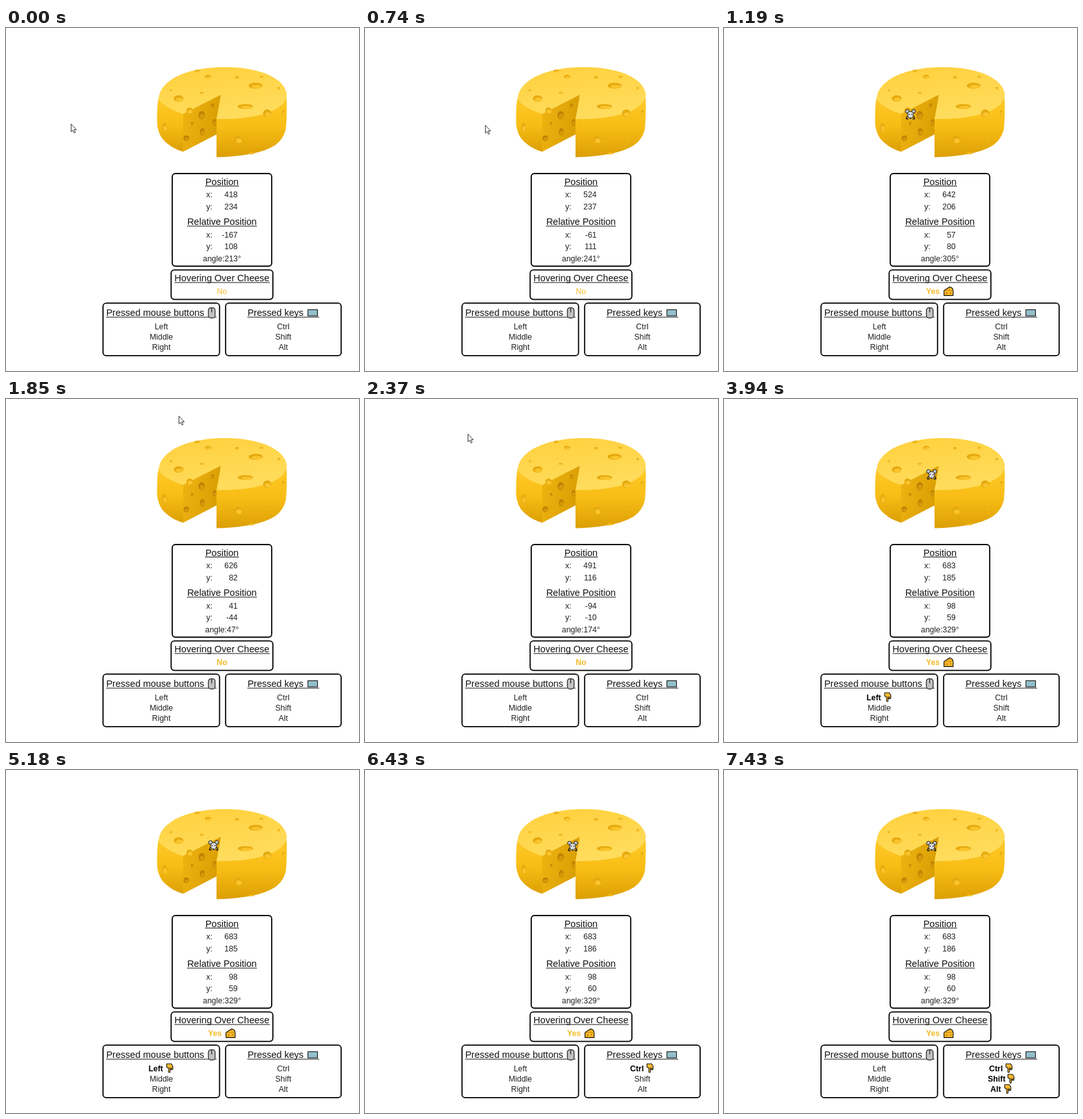
Recreate the animation shown at these times as an HTML page. Size 550 px wide and 535 px high, loop 8 s.

```html
<!DOCTYPE html>
<html lang="en">
<head>
<meta charset="utf-8">
<title>Cheese pointer tracker</title>
<style>
  html, body { margin: 0; height: 100%; overflow: hidden; background: #fff; }
  svg { display: block; }
  text { font: 12.4px "Liberation Sans", Arial, sans-serif; fill: #222; }
  .title { font-size: 14.54px; text-anchor: middle; fill: #111; }
  .mid { text-anchor: middle; }
  .end { text-anchor: end; }
  .bold { font-weight: bold; fill: #000; }
  #hover { fill: #f5ba28; }
</style>
</head>
<body>
<svg id="stage" width="550" height="535" viewBox="0 0 550 535">
  <defs>
    <linearGradient id="top" x2="0.3" y2="1">
      <stop stop-color="#ffd03c"/><stop offset="1" stop-color="#ffdc5c"/>
    </linearGradient>
    <linearGradient id="side" x2="0" y2="1">
      <stop offset=".15" stop-color="#fdc623"/><stop offset=".5" stop-color="#f8bd15"/><stop offset="1" stop-color="#dc9f05"/>
    </linearGradient>
    <linearGradient id="cut" x2="1" y2=".3">
      <stop stop-color="#f0b512"/><stop offset="1" stop-color="#d99e03"/>
    </linearGradient>
    <path id="hand" d="M1.3 1.2H8.5L10.9 5V9.6L9.4 10.8 8 9.8 6.6 10.6V14.2Q5.4 15.9 4.2 14.2V8L1.3 6.2ZM6.6 10.6V7M8.9 9.6V7" fill="#fcbb2f" stroke="#111" stroke-width="1.1" stroke-linejoin="round"/>
  </defs>

  <g id="cheese">
    <path fill="url(#side)" d="M238 108Q235 118 235.500 150Q237 163 243 172Q254 186 276 193V130Z"/>
    <path fill="url(#cut)" d="M276 133L335 103 328 166 276 193Z"/>
    <path fill="url(#side)" d="M328 141L437 106Q438.500 130 436 158Q432 174 419 183Q392 200 328 201.500Z"/>
    <path fill="url(#top)" d="M238 112C237 83 280 61 340 61C398 61 434 79 437.500 103C438 128 392 143 328 142L335 104 276 134Q250 126 238 112Z"/>
  </g>

  <g fill="none" stroke="#000" stroke-width="1.8">
    <rect x="259" y="227" width="155" height="144.500" rx="5"/>
    <rect x="257.300" y="377.300" width="158.500" height="46" rx="5"/>
    <rect x="151.200" y="429.200" width="181.500" height="82" rx="5"/>
    <rect x="342.200" y="429.200" width="180" height="82" rx="5"/>
  </g>
  <g id="labels"></g>

  <g stroke="#222" stroke-width="1.2">
    <rect x="315.300" y="436.300" width="10.500" height="16" rx="4" fill="#bfc1c2"/>
    <path d="M320.500 437V443.500"/>
    <rect x="470.400" y="439.400" width="15" height="9.600" fill="#92bfcb"/>
  </g>

  <text id="hover" class="mid" x="336.500" y="415">No</text>
  <g id="wedge" stroke="#111" stroke-linejoin="round">
    <path d="M342.800 409.500L351.500 403.800Q356.500 404.500 357 409.500V417.300H342.800Z" fill="#fcb92b" stroke-width="1.2"/>
    <path d="M342.800 409.500H357" stroke="#b87c10" stroke-width=".8"/>
    <g fill="#c8860c" stroke="none"><circle cx="347" cy="413.500" r="1.500"/><circle cx="353" cy="413" r="1.300"/><circle cx="351" cy="406.500" r="1"/></g>
  </g>

  <path id="arrow" d="M.5.7V12.800L3.200 10.300 5.200 14.700 7 13.900 5.100 9.600H8.800Z" fill="#fff" stroke="#222" stroke-width=".9"/>
  <g id="mouse" stroke="#1a1a1a" stroke-linejoin="round">
    <path d="M3.500 11.500L2 15.500 5 16M13.500 11.500L15 15.500 12 16" fill="none" stroke-width="1.500"/>
    <g fill="#c9cbcc" stroke-width="1"><circle cx="3.600" cy="4" r="2.900"/><circle cx="13.400" cy="4" r="2.900"/></g>
    <path d="M4.200 5.500Q8.500 2.800 12.800 5.500L13 10.500Q11.500 15.500 8.500 15.500T4 10.500Z" fill="#d9dbdc" stroke-width=".9"/>
    <path d="M6.300 8V9.600M10.700 8V9.600M8.500 13.300V15" stroke-width="1.400"/>
  </g>
</svg>

<script>
const LOOP = 8000, SCALE = 0.808, ORIGIN = { x: 585, y: 126 }, CHEESE = { x: 235.9, y: 61.6, w: 251, h: 174 };
const $ = id => document.getElementById(id);

function add(parent, tag, attrs, content = '') {
  const el = document.createElementNS('http://www.w3.org/2000/svg', tag);
  for (const name in attrs) el.setAttribute(name, attrs[name]);
  el.textContent = content;
  return parent.appendChild(el);
}
const label = (x, y, content, cls = '') => add($('labels'), 'text', { x, y, class: cls }, content);
const show = (el, on) => el.setAttribute('visibility', on ? 'visible' : 'hidden');

// Holes: x, y, rx, ry
[
  [389, 90, 11, 4.5], [373, 122.5, 12, 3.8], [269, 110, 7.5, 5], [286, 129, 5, 5], [315, 76, 5, 3],
  [298, 67, 4, 2], [360, 77, 3, 2], [257, 97, 2, 1.5], [305, 101, 3, 1.6], [398, 76, 3, 1.5],
  [407, 133, 6.5, 6], [425, 94, 2, 2], [305, 136, 5, 6.5], [322, 121, 2.5, 3.5], [290, 149, 1.8, 2.6],
  [306, 162, 3.8, 6], [281, 172, 4.5, 4.5], [325, 147, 2.8, 5], [247, 155, 3.5, 7], [362, 174, 6, 6],
  [432, 132, 2, 4], [410, 170, 2.2, 2.2], [382, 195, 5, 2]
].forEach(([cx, cy, rx, ry], i) => {
  const onCut = i > 11 && i < 18;
  add($('cheese'), 'ellipse', { cx, cy, rx, ry, fill: onCut ? '#bf8203' : '#e6a90f' });
  add($('cheese'), 'ellipse', { cx: cx + rx * .15, cy: cy + ry * .3, rx: rx * .75, ry: ry * .6, fill: onCut ? '#d39a0b' : '#f9c42c' });
});

// Titles: text, text centre, baseline, underline start and end
[
  ['Position', 336.5, 244.5, 310, 363], ['Relative Position', 336.5, 307, 282, 391],
  ['Hovering Over Cheese', 336.5, 395, 262.5, 411],
  ['Pressed mouse buttons', 232.5, 449, 156, 328], ['Pressed keys', 420, 449, 376, 488]
].forEach(([content, x, y, from, to]) => {
  label(x, y, content, 'title');
  add($('labels'), 'path', { d: `M${from} ${y + 2}H${to}`, stroke: '#111' });
});

const readouts = [264, 283, 326.5, 345].map((y, i) => {
  label(312, y, 'xy'[i % 2] + ':');
  return label(361, y, '', 'end');
});
const angleText = label(336.5, 363.5, '', 'mid');

// Inputs: name, centre, baseline, pressed start, hand x, press and release times
const inputs = [
  ['Left', 242, 469.5, 222, 249, 3940, 5630], ['Middle', 242, 486, 214, 257, 4570, 5180], ['Right', 242, 502],
  ['Ctrl', 432, 469.5, 413, 438, 6430, LOOP], ['Shift', 432, 486, 411, 441, 7430, LOOP], ['Alt', 432, 502, 415, 436, 6930, LOOP]
].map(([name, centre, y, left, handX, press, release]) => ({
  centre, left, press, release,
  text: label(centre, y, name),
  hand: add($('labels'), 'use', { href: '#hand', x: handX, y: y - 12.5 })
}));

// Pointer path: step, page x, page y
const path = [
  [-1, 418, 234], [5, 492, 240], [12, 611, 221], [14, 642, 206], [19, 671, 149], [24, 626, 82], [25, 613, 72],
  [27, 582, 69], [31, 505, 100], [33, 482, 135], [35, 484, 170], [37, 528, 205], [39, 581, 219], [44, 683, 185]
];

function slope(i, axis) {
  const a = path[i - 1], b = path[i + 1];
  return a && b ? (b[axis] - a[axis]) / (b[0] - a[0]) : 0;
}

function pointAt(step) {
  step = Math.min(Math.max(step, -1), 44);
  const i = Math.max(1, path.findIndex(p => p[0] >= step));
  const a = path[i - 1], b = path[i], span = b[0] - a[0], u = (step - a[0]) / span;
  const at = axis => Math.round(
    a[axis] * (1 + 2 * u) * (1 - u) ** 2 + b[axis] * u * u * (3 - 2 * u) +
    span * u * (1 - u) * (slope(i - 1, axis) * (1 - u) - slope(i, axis) * u));
  return { x: at(1), y: at(2) };
}

function draw(t) {
  let step = Math.floor((t - 280) / 65);
  if (step > 39) step = Math.max(39, step - 2); // short rest beside the cheese
  const p = pointAt(step);
  if (t >= 5880) p.y++;
  const rx = p.x - ORIGIN.x, ry = p.y - ORIGIN.y;
  const hovering = rx >= 0 && ry >= 0 && rx < CHEESE.w && ry < CHEESE.h;

  [p.x, p.y, rx, ry].forEach((value, i) => readouts[i].textContent = value);
  const degrees = Math.round(Math.atan2(-ry, rx) * 180 / Math.PI);
  angleText.textContent = `angle:${(degrees + 360) % 360}°`;

  $('hover').textContent = hovering ? 'Yes' : 'No';
  $('hover').setAttribute('x', hovering ? 325.5 : 336.5);
  $('hover').style.fontWeight = t < 1000 && !hovering ? 'normal' : 'bold';
  show($('wedge'), hovering);

  const place = `translate(${Math.round(CHEESE.x + rx * SCALE)} ${Math.round(CHEESE.y + ry * SCALE)})`;
  $('arrow').setAttribute('transform', place);
  $('mouse').setAttribute('transform', place);
  show($('arrow'), !hovering && t < 2980);
  show($('mouse'), hovering);

  for (const input of inputs) {
    const down = t >= input.press && t < input.release;
    input.text.setAttribute('class', down ? 'bold' : 'mid');
    input.text.setAttribute('x', down ? input.left : input.centre);
    show(input.hand, down);
  }
}

const start = performance.now();
function tick() {
  draw((performance.now() - start) % LOOP);
  requestAnimationFrame(tick);
}
tick();
</script>
</body>
</html>
```
